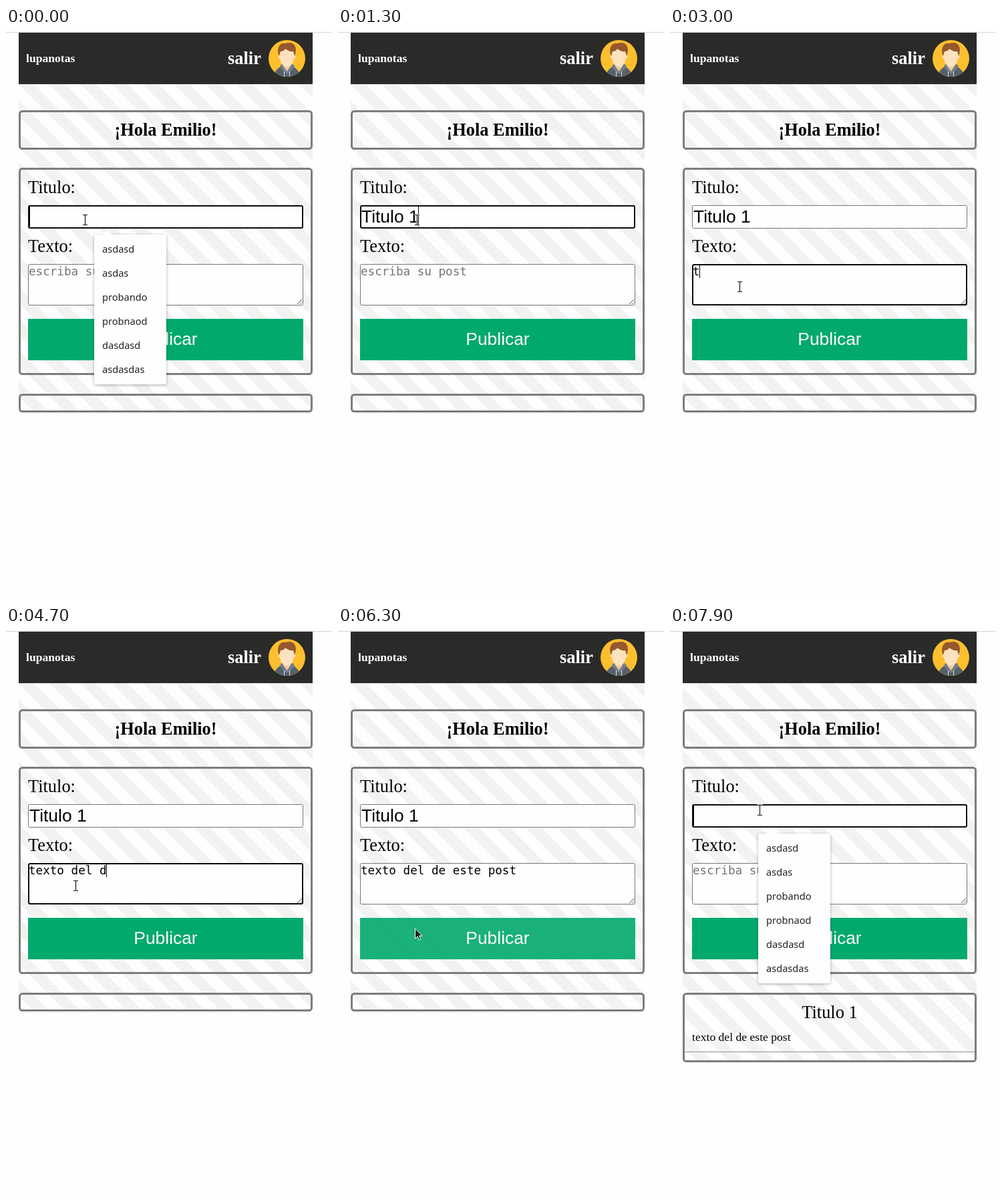
These frames come from a looping animation (488x854 px, 8000 ms). An HTML page:

```html
<!DOCTYPE html>
<html lang="es">
<head>
<meta charset="utf-8">
<title>Blog</title>
<style>
  html, body { margin: 0; width: 100%; height: 100%; overflow: hidden; background: #fefefd; }
  #stage { position: relative; width: 488px; height: 854px; overflow: hidden; }
  #stripes {
    position: absolute; left: 19px; top: 84px; width: 440px;
    background: repeating-linear-gradient(45deg, #fefefd 0 16.5px, #f2f2f1 16.5px 33px);
  }
  svg { position: absolute; left: 0; top: 0; }
  text { white-space: pre; }
  .serif { font: 26.4px "Liberation Serif", serif; }
  .small { font-size: 17.6px; }
  .bold { font-weight: 700; }
  .sans { font: 26.4px "Liberation Sans", sans-serif; }
  .mono { font: 17.6px "DejaVu Sans Mono", monospace; }
  .item { font: 14.6px "Noto Sans", sans-serif; fill: #202124; }
  .white { fill: #fff; }
  .mid { text-anchor: middle; }
  .frame { fill: none; stroke: #7d7d7c; stroke-width: 3; }
  .field { fill: #fefefd; stroke: #767676; stroke-width: 1; }
  .field.focus { stroke: #0b0b0b; stroke-width: 2; }
  #menu rect, #menu path { fill: #fefefd; }
  #menu .box { filter: drop-shadow(0 1px 2px #0005); }
</style>
</head>
<body>
<div id="stage">
  <div id="stripes"></div>
  <svg width="488" height="854" viewBox="0 0 488 854">
    <defs><clipPath id="round"><circle cx="420.5" cy="45.5" r="27.5"/></clipPath></defs>

    <rect y="6" width="488" height="1" fill="#d6d6d5"/>
    <rect x="19" y="7" width="440" height="77" fill="#2a2a29"/>
    <text class="serif small bold white" x="30" y="51">lupanotas</text>
    <text class="serif bold white" x="332" y="54">salir</text>

    <g clip-path="url(#round)">
      <rect x="393" y="18" width="55" height="55" fill="#fdbf2d"/>
      <path d="M401 74 Q402 62 411 58 L430 58 Q439 62 440 74Z" fill="#56616b"/>
      <path d="M410 58 Q412 53 415 54 L420.5 65 L426 54 Q430 53 432 58 L423 68 H418Z" fill="#727d86"/>
      <path d="M415 50 H426 V57 L420.5 65 L415 57Z" fill="#f1c9a0"/>
      <path d="M410 32 H431 V44 Q430 57 420.5 58 Q411 57 410 44Z" fill="#fde2bf"/>
      <circle cx="409.5" cy="43" r="2.2" fill="#fde2bf"/>
      <circle cx="431.5" cy="43" r="2.2" fill="#fde2bf"/>
      <path d="M409 42 Q405 33 409 27 Q412 22 418 23 Q428 20 432 26 Q436 32 432 42 L430 35 Q424 36 418 31 Q416 35 411 35Z" fill="#95582f"/>
      <path d="M416.5 65 V73 M424.5 65 V73" stroke="#dcdfe2" stroke-width="1"/>
    </g>

    <rect class="frame" x="20.5" y="124.5" width="437" height="56" rx="4"/>
    <text class="serif bold mid" x="239" y="161">¡Hola Emilio!</text>

    <rect class="frame" x="20.5" y="210.5" width="437" height="307" rx="4"/>
    <text class="serif" x="33" y="247">Titulo:</text>
    <rect id="titleBox" class="field" rx="2"/>
    <text id="title" class="sans" x="35" y="291"></text>
    <text class="serif" x="33" y="335">Texto:</text>
    <rect id="bodyBox" class="field" rx="2"/>
    <text id="body" class="mono" x="34" y="370"></text>
    <path d="M436 413 L443 406 M440.5 413 L443 410.5" stroke="#555" stroke-width="1"/>
    <rect id="caret" width="1"/>
    <g id="button">
      <rect x="33" y="435" width="412" height="62" fill="#02a96d"/>
      <text class="sans white mid" x="239" y="474">Publicar</text>
    </g>

    <rect id="posts" class="frame" x="20.5" y="548.5" width="437" rx="4"/>
    <g id="post">
      <text class="serif mid" x="239" y="585">Titulo 1</text>
      <text class="serif small" x="33" y="619">texto del de este post</text>
      <rect x="22" y="635" width="434" height="1" fill="#8f8f8e"/>
    </g>

    <g id="menu">
      <rect class="box" x="132" y="309" width="108" height="224" rx="3"/>
      <path d="M143 310 L151.500 302 L160 310Z"/>
    </g>

    <g id="beam" fill="none">
      <path d="M-4 -7.500 H-1 L0 -6.500 L1 -7.500 H4 M0 -7 V7 M-4 7.500 H-1 L0 6.500 L1 7.500 H4" stroke="#fff" stroke-width="2.600"/>
      <path d="M-3.500 -7.500 H-1 L0 -6.500 L1 -7.500 H3.500 M0 -7 V7 M-3.500 7.500 H-1 L0 6.500 L1 7.500 H3.500" stroke="#161616" stroke-width="1.200"/>
    </g>
    <path id="arrow" d="M0 0 V15 L3.500 11.800 L6 17 L8.400 15.900 L6 10.900 H10.800Z" fill="#222" stroke="#fff" stroke-width="1"/>
  </svg>
</div>
<script>
const LOOP = 8000;
const $ = id => document.getElementById(id);
const TITLE = 'Titulo 1', DRAFT = 'texto del p', TEXT = 'texto del de este post';

const start = {
  title: '', body: '', focus: 'title', caret: true, menu: true,
  hover: false, posted: false, pointer: 'beam', x: 118.5, y: 287
};

// Each step is a time and the values that change then.
const steps = [];
const at = (t, change) => steps.push([t, change]);
const type = (t, field, text, counts) =>
  counts.forEach((n, i) => at(t + i * 100, { [field]: text.slice(0, n), caret: true }));
const move = (t, points) => points.forEach(([x, y], i) => at(t + i * 100, { x, y }));

at(500, { menu: false });
type(500, 'title', TITLE, [1, 2, 3, 4, 5]);
type(1100, 'title', TITLE, [6, 7, 8]);
move(1700, [[117, 307], [109, 358], [104.5, 387]]);
at(2000, { focus: 'body' });
type(3000, 'body', DRAFT, [1, 2, 3, 5, 6, 7, 9, 10, 11]);
type(4300, 'body', TEXT, [10]);
at(4500, { caret: false });
type(4700, 'body', TEXT, [11, 13, 14]);
type(5100, 'body', TEXT, [15, 16, 18, 19, 21, 22]);
move(5900, [[107, 404], [112, 440], [115.5, 451]]);
at(6000, { pointer: 'arrow', hover: true });
at(6200, { focus: '' });
at(6500, { title: '', body: '', hover: false });
at(6600, { posted: true });
move(7100, [[125.5, 293], [130, 275], [133, 262], [134, 268]]);
at(7100, { pointer: 'beam' });
at(7700, { focus: 'title', caret: true });
at(7800, { menu: true });
move(7800, [[134.5, 274]]);

['asdasd', 'asdas', 'probando', 'probnaod', 'dasdasd', 'asdasdas'].forEach((word, i) => {
  const item = document.createElementNS('http://www.w3.org/2000/svg', 'text');
  item.setAttribute('class', 'item');
  item.setAttribute('x', 144);
  item.setAttribute('y', 336 + i * 36);
  item.textContent = word;
  $('menu').append(item);
});

const set = (id, attrs) => {
  for (const key in attrs) $(id).setAttribute(key, attrs[key]);
};
const show = (id, on) => { $(id).style.display = on ? '' : 'none'; };

function drawField(id, y, height, focused) {
  const inset = focused ? 1 : 0.5;
  set(id, {
    class: focused ? 'field focus' : 'field',
    x: 33 + inset, y: y + inset, width: 412 - 2 * inset, height: height - 2 * inset
  });
}

function drawCaret(s) {
  show('caret', s.focus && s.caret);
  if (s.focus === 'title') {
    const width = s.title ? $('title').getComputedTextLength() : 0;
    set('caret', { x: Math.floor(35 + width), y: 267, height: 30 });
  } else {
    set('caret', { x: Math.max(35, Math.floor(34 + s.body.length * 10.595)), y: 355, height: 19 });
  }
}

function draw(t) {
  const s = { ...start };
  for (const [time, change] of steps) if (time <= t) Object.assign(s, change);

  const bottom = s.posted ? 651 : 575;
  $('stripes').style.height = bottom - 84 + 'px';
  set('posts', { height: bottom - 550 });
  show('post', s.posted);

  drawField('titleBox', 265, 35, s.focus === 'title');
  drawField('bodyBox', 353, 62, s.focus === 'body');
  $('title').textContent = s.title;
  $('body').textContent = s.body || 'escriba su post';
  $('body').style.fill = s.body ? '#000' : '#757575';
  drawCaret(s);

  $('button').style.opacity = s.hover ? 0.9 : 1;
  show('menu', s.menu);
  for (const id of ['beam', 'arrow']) show(id, s.pointer === id);
  set(s.pointer, { transform: `translate(${s.x} ${s.y})` });
}

const begin = performance.now();
function tick() {
  draw((performance.now() - begin) % LOOP);
  requestAnimationFrame(tick);
}
tick();
</script>
</body>
</html>
```
